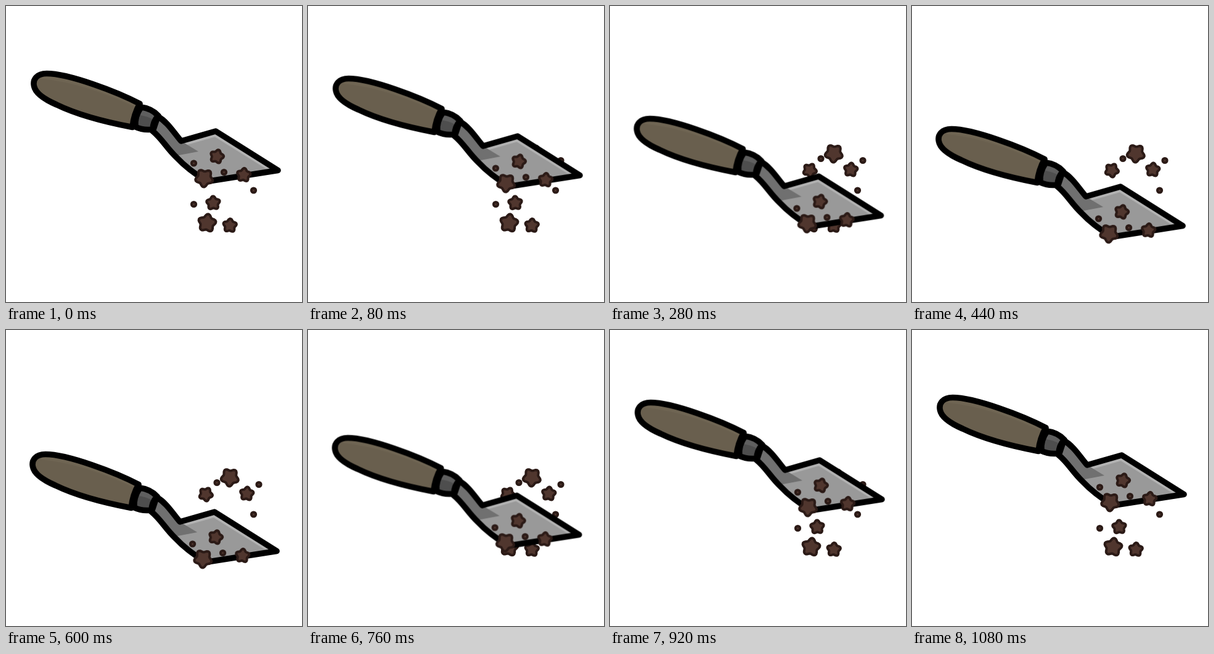
Write an HTML page that moves like this. It is 480x480 px and loops after 1.12 s.

```html
<!DOCTYPE html>
<html lang="en">
<head>
<meta charset="utf-8">
<title>Trowel</title>
<style>
  html, body { margin: 0; width: 100%; height: 100%; overflow: hidden; background: #fff; }
  svg { display: block; width: 100%; height: 100%; }
  .line { fill: none; stroke: #000; stroke-width: 9.6; stroke-linejoin: round; }
  .dirt { fill: #50362e; stroke: #2b1a16; stroke-width: 4; stroke-linejoin: round; }
</style>
</head>
<body>
<svg viewBox="0 0 480 480">
  <defs>
    <path id="handle" d="M217 158.500C180 139 102 109.500 66 109.500C50 109.500 43 119 45.500 130C48 143 66 153 82 160C115 176 160 188 205 196.500Q207 176 217 158.500Z"/>
    <path id="ferrule" d="M219 164Q236 166 247 178Q238 188 238 200Q222 202 210 196Q208 180 219 164Z"/>
    <path id="blade" d="M246 179C262 188 272 205 284 219L340 203L441 266.500L326 284.500C304 271 290 260 276 245C261 231 252 214 238 203Z"/>
    <clipPath id="inHandle"><use href="#handle"/></clipPath>
    <clipPath id="inFerrule"><use href="#ferrule"/></clipPath>
    <clipPath id="inBlade"><use href="#blade"/></clipPath>
  </defs>
  <g id="ground" class="dirt"></g>
  <g id="trowel">
    <use href="#blade" fill="#999"/>
    <g clip-path="url(#inBlade)">
      <path d="M284 219L340 203L441 266" fill="none" stroke="#b3b3b3" stroke-width="17"/>
      <path d="M240 170L284 219L312 236L275 243L230 210Z" fill="#707070"/>
    </g>
    <use href="#blade" class="line"/>
    <use href="#handle" fill="#695f4e"/>
    <path d="M50 105L222 155L216 167Q130 125 58 118Z" fill="#6f6553" clip-path="url(#inHandle)"/>
    <use href="#handle" class="line"/>
    <use href="#ferrule" fill="#4e4e4e"/>
    <path d="M212 160L250 172L242 186Q228 177 212 177Z" fill="#5f5f5f" clip-path="url(#inFerrule)"/>
    <use href="#ferrule" class="line"/>
    <g id="load" class="dirt"></g>
  </g>
</svg>
<script>
const NS = 'http://www.w3.org/2000/svg';
const LOOP = 1120, STEP = 40;
const SMALL = 9.6, BIG = 12.6;
const byId = id => document.getElementById(id);

function add(parent, tag, attrs) {
  const el = document.createElementNS(NS, tag);
  for (const key in attrs) el.setAttribute(key, attrs[key]);
  parent.append(el);
}

// A lump of soil: a circle with five soft lobes, one of them at the tilt angle.
function clump(parent, x, y, size, tilt) {
  const points = Array.from({ length: 40 }, (_, i) => {
    const a = i / 40 * 2 * Math.PI;
    const r = size * (1 + 0.16 * Math.cos(5 * (a - tilt * Math.PI / 180)));
    return [x + r * Math.cos(a), y + r * Math.sin(a)];
  });
  add(parent, 'polygon', { points: points.join(' ') });
}
const crumb = (parent, cx, cy) => add(parent, 'circle', { cx, cy, r: 3.6 });

const ground = byId('ground');
clump(ground, 363, 239, BIG, 22);
clump(ground, 324, 266.5, SMALL, 10);
clump(ground, 390.5, 265.5, SMALL, -12);
clump(ground, 336, 319.5, SMALL, -20);
clump(ground, 326, 352, BIG, -10);
clump(ground, 363, 356, SMALL, -14);
crumb(ground, 342, 247.5);
crumb(ground, 410, 250.5);
crumb(ground, 401.5, 299);
crumb(ground, 304.5, 321.5);

const load = byId('load');
clump(load, 342, 244, SMALL, -2);
clump(load, 385.5, 274, SMALL, -12);
clump(load, 321.5, 279, BIG, 22);
crumb(load, 304.5, 255);
crumb(load, 353.5, 269.5);

const rest = 'translate(0px, 0px)', dug = 'translate(-2px, 92.5px)';
const dig = byId('trowel').animate([
  { offset: 0, transform: rest, easing: 'cubic-bezier(.33, 0, .2, 1)' },
  { offset: 560 / LOOP, transform: dug, easing: 'cubic-bezier(.62, 0, .26, 1)' },
  { offset: 1080 / LOOP, transform: rest },
  { offset: 1, transform: rest }
], { duration: LOOP, fill: 'both' });
dig.pause();

// The pose is held for each 40 ms step.
const start = performance.now();
function draw() {
  const t = Math.max(0, performance.now() - start) % LOOP;
  dig.currentTime = Math.floor(t / STEP) * STEP;
  requestAnimationFrame(draw);
}
draw();
</script>
</body>
</html>
```
